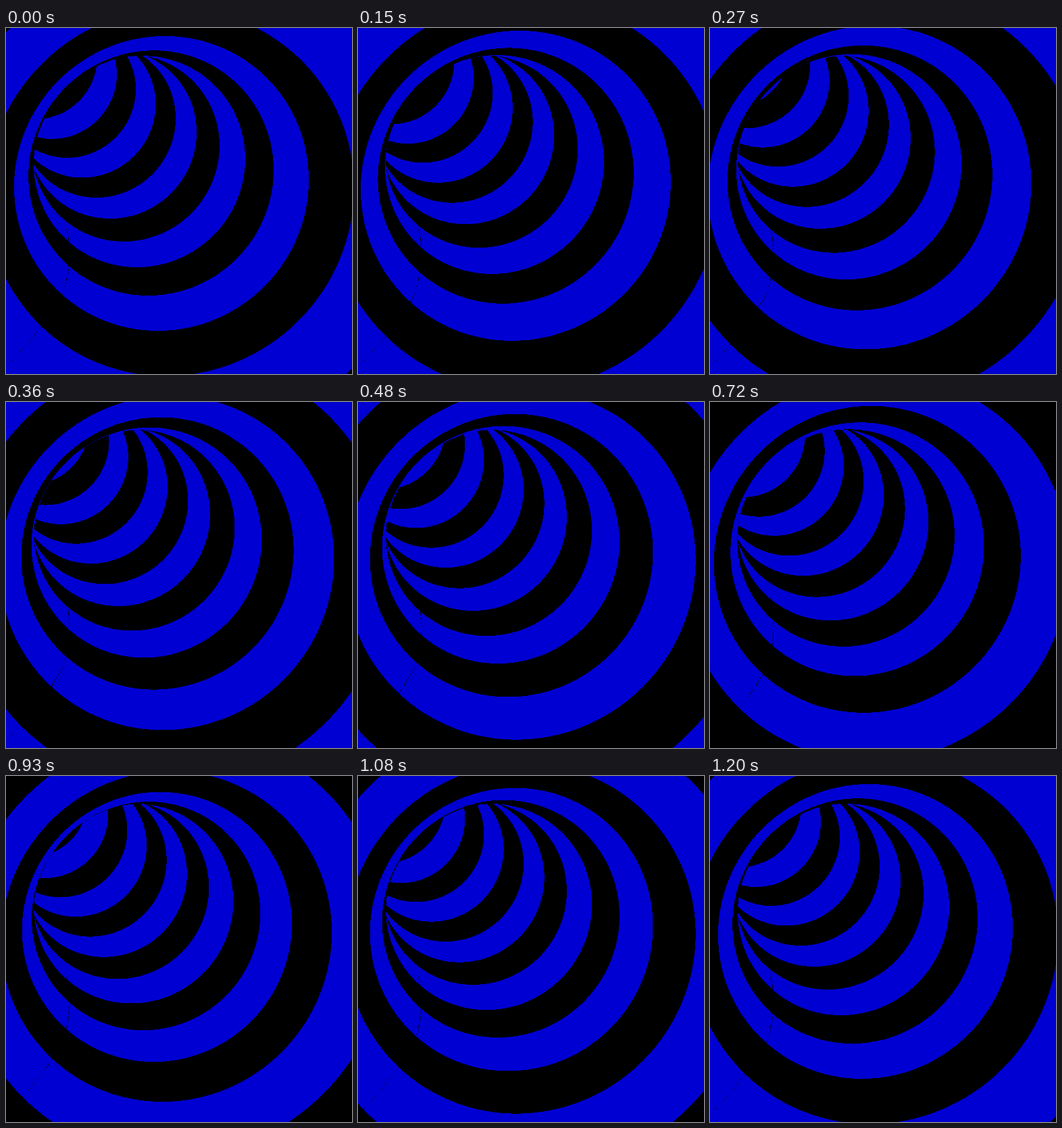
Animation of 512 by 512 pixels, one loop 1.23 s. Source, as an HTML page with a canvas:

```html
<!DOCTYPE html>
<html lang="en">
<head>
<meta charset="utf-8">
<title>Tunnel</title>
<style>
  html, body { margin: 0; width: 100%; height: 100%; overflow: hidden; background: #000; }
  canvas { display: block; width: 512px; height: 512px; }
</style>
</head>
<body>
<canvas id="stage" width="512" height="512"></canvas>
<script>
const SIZE = 512, STEP = 30, LOOP = 1230, CYCLE = 40;
const PER_BAND = 20, NEAR = -50, FAR = 220;
const BLUE = 0xffd20000, BLACK = 0xff000000;

// Rings are slightly flattened along the diagonal they recede on
const SQUASH = 0.012;
const ALONG = 1 / (1 - SQUASH) ** 2, ACROSS = 1 / (1 + SQUASH) ** 2;

// Ring centres on the diagonal, one per band from depth -2 to 10
const CENTRES = [255.5, 243, 230, 214.6, 197.5, 177.5, 157.1, 136.6, 115.4, 92.7, 70.2, 45.7, 20];

function centre(n) {
  const last = CENTRES.length - 1;
  const i = Math.max(0, Math.min(last - 1, Math.floor(n + 2)));
  const u = n + 2 - i;
  const b = CENTRES[i], c = CENTRES[i + 1];
  const a = i > 0 ? CENTRES[i - 1] : 2 * b - c;
  const d = i + 2 <= last ? CENTRES[i + 2] : 2 * c - b;
  return b + u * (c - a + u * (2 * a - 5 * b + 4 * c - d + u * (3 * (b - c) + d - a))) / 2;
}

function radius(n) {
  return 1 / (0.004587 + (n < 0 ? 0.00091 * n : 0.00095 * n - 0.0000239 * n * n));
}

// Depth of the wall at each pixel: the first ring that no longer contains it
function buildDepth() {
  const rings = [];
  for (let k = NEAR; k <= FAR; k++) {
    const n = k / PER_BAND, r = radius(n);
    rings.push({ c: centre(n), limit: 2 * r * r });
  }
  const depth = new Int16Array(SIZE * SIZE);
  for (let y = 0; y < SIZE; y++) {
    for (let x = 0; x < SIZE; x++) {
      const across = (x - y) * (x - y) * ACROSS;
      let j = 0;
      while (j < rings.length - 1) {
        const along = x + y + 1 - 2 * rings[j].c;
        if (along * along * ALONG + across > rings[j].limit) break;
        j++;
      }
      depth[y * SIZE + x] = j + NEAR;
    }
  }
  return depth;
}

// Sparse dark specks along the seam of the tube
function buildSeam() {
  const dots = [];
  let seed = 7;
  for (let n = -1.85; n < 2.5; n += 0.012) {
    seed = (seed * 16807) % 2147483647;
    if (seed / 2147483647 > 0.3) continue;
    const angle = (n < 0 ? 132 - 2 * n : 132) * Math.PI / 180;
    const x = Math.floor(centre(n) + radius(n) * Math.cos(angle));
    const y = Math.floor(centre(n) + radius(n) * Math.sin(angle));
    if (x >= 0 && y < SIZE) dots.push(y * SIZE + x);
  }
  return dots;
}

const ctx = document.getElementById("stage").getContext("2d");
const image = ctx.createImageData(SIZE, SIZE);
const pixels = new Uint32Array(image.data.buffer);
const depth = buildDepth();
const seam = buildSeam();

function draw(phase) {
  for (let i = 0; i < pixels.length; i++) {
    const band = Math.floor((depth[i] - 1 + phase) / PER_BAND);
    pixels[i] = band & 1 ? BLACK : BLUE;
  }
  for (const i of seam) pixels[i] = BLACK;
  ctx.putImageData(image, 0, 0);
}

let start = null, shown = -1;

function tick(now) {
  if (start === null) start = now;
  const phase = Math.floor(((now - start) % LOOP) / STEP) % CYCLE;
  if (phase !== shown) draw(shown = phase);
  requestAnimationFrame(tick);
}

draw(0);
requestAnimationFrame(tick);
</script>
</body>
</html>
```
